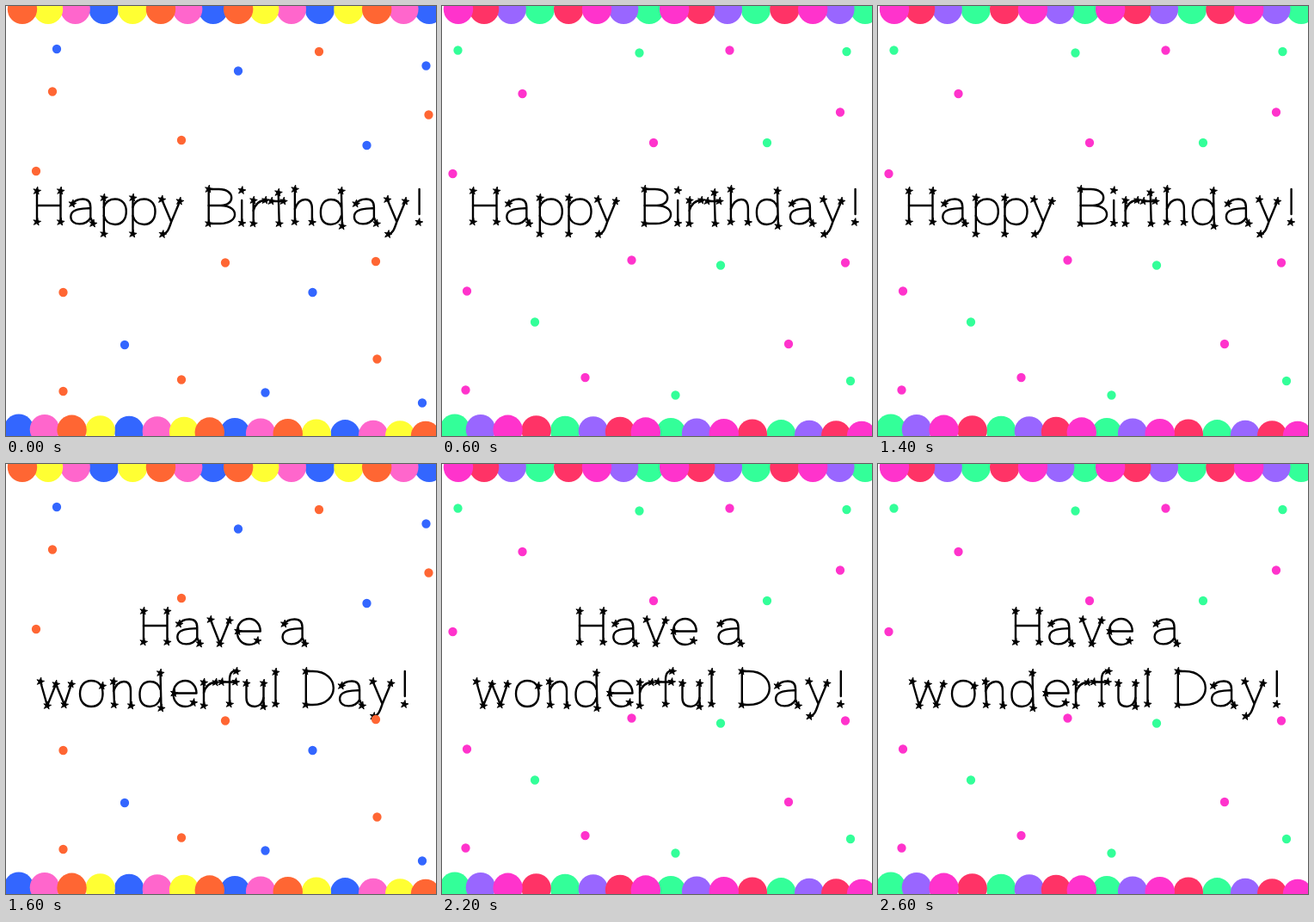
These frames come from a looping animation (500 px wide and 500 px high, 2.8 s). An HTML page:

```html
<!DOCTYPE html>
<html lang="en">
<head>
<meta charset="utf-8">
<title>Happy Birthday</title>
<style>
  html, body { margin: 0; width: 100%; height: 100%; overflow: hidden; background: #fff; }
  svg { display: block; width: 100vw; height: 100vh; }
  path { fill: none; stroke-linecap: round; stroke-linejoin: round; }
  .letter path { stroke: #000; stroke-width: 2.4; }
  .stars { marker: url(#star); }
  .label { fill: transparent; font: 300 50px Lato, sans-serif; }
  .dots path { stroke-width: 10.3; }
  .warm { --main: #f63; --alt: #ff3; --soft: #f6c; --deep: #36f; animation: early 400ms step-end infinite; }
  .cool { --main: #f3c; --alt: #f36; --soft: #96f; --deep: #3f9; animation: late 400ms step-end infinite; }
  .main { fill: var(--main); stroke: var(--main); }
  .alt { fill: var(--alt); }
  .soft { fill: var(--soft); }
  .deep { fill: var(--deep); stroke: var(--deep); }
  circle { stroke: none !important; }
  #greeting { animation: greeting 2800ms step-end infinite; }
  #wish { animation: wish 2800ms step-end infinite; }
  @keyframes early { 0% { visibility: visible; } 50%, 100% { visibility: hidden; } }
  @keyframes late { 0% { visibility: hidden; } 50%, 100% { visibility: visible; } }
  @keyframes greeting { 0% { visibility: visible; } 57.142857%, 100% { visibility: hidden; } }
  @keyframes wish { 0% { visibility: hidden; } 57.142857%, 100% { visibility: visible; } }
</style>
</head>
<body>
<svg viewBox="0 0 500 500">
  <marker id="star" markerUnits="userSpaceOnUse" overflow="visible" orient="10">
    <path d="M0-4.6L2.7 3.7L-4.4-1.4H4.4L-2.7 3.7Z" style="fill:#000;stroke:#000;stroke-width:.9"/>
  </marker>
  <g id="greeting"></g>
  <g id="wish"></g>
  <g class="warm dots">
    <path class="deep" d="M59 50h0M270 75.5h0M488.5 69.5h0M419.5 162h0M356.5 333h0M138 394h0M301.5 449.5h0M484 461.5h0"/>
    <path class="main" d="M54 99.5h0M364 53h0M491.5 126.5h0M204 156h0M35 192h0M255 298.5h0M430 297h0M66.5 333h0M431.5 410.5h0M204 434.5h0M66.5 448h0"/>
  </g>
  <g class="cool dots">
    <path class="deep" d="M18.5 51.5h0M229.5 54.5h0M470.5 53h0M378 159h0M324 301.5h0M108 367.5h0M271.5 452.5h0M475 436h0"/>
    <path class="main" d="M93.5 102h0M334.5 51.5h0M463 123.5h0M246 159h0M12.5 195h0M220.5 295.5h0M469 298.5h0M29 331.5h0M403 393h0M166.5 432h0M27.5 446.5h0"/>
  </g>
  <g class="warm scallops"></g>
  <g class="cool scallops"></g>
</svg>
<script>
const ARCH = 'M0-16C3-24 8-27 12-27C18-27 20-22 20-16V-1';

// Letter: advance, strokes with a star on every vertex, plain strokes.
const GLYPHS = {
  H: [39.3, 'M0-37V-1M27.5-37V-1', 'M0-20H27'],
  a: [38.5, 'M2-22M26 1', 'M2-22C5-26.5 10-27.5 14-27.5C20-27.5 23-24 23-18V-6L26 1M23-17C14-16 0-17 0-7C0 4 19 4 23-6'],
  p: [33.7, 'M0-29V13', 'M0-18C2-25 8-27.5 13-27.5C22-27.5 26-21 26-13C26-4 21 2 13 2C7 2 2-1 0-8'],
  y: [37.2, 'M0-27M21-25M1 13.5', 'M0-27L11-1M21-25L11-1C8 8 6 13 1 13'],
  B: [39, 'M0-39V1', 'M0-39H12C31-39 31-20 14-20H0M14-20C36-20 36 1 13 1H0'],
  i: [13, 'M-.5-37.5M-.5 .5', 'M-.5-26V0'],
  r: [21, 'M0-26V1M14-26', 'M0-14C2-21 6-26 14-26'],
  t: [27.2, 'M8-35L9 1M0-25H14', ''],
  h: [30, 'M0-39V-1M20-.5', ARCH],
  d: [39, 'M24-37L25 4', 'M24-18C22-25 17-27 12-27C4-27 0-21 0-12C0-3 4 2 12 2C18 2 22-1 24-8'],
  v: [31, 'M0-27L11 1L22-26', ''],
  e: [35.5, 'M1-13.5M23.5-2.5', 'M1-13.5H27C27-22 21-28 14-28C6-28 0-22 0-13C0-4 6 2 14 2C19 2 22 0 24-2'],
  w: [46, 'M0-27L8 1L18-24L28 0L36-24', ''],
  o: [39, 'M26-22', 'M0-13C0-22 5-28 13-28C22-28 26.5-22 26.5-13C26.5-4 22 2 13 2C5 2 0-4 0-13Z'],
  n: [30.5, 'M0-27L1 0M20.5 1', ARCH],
  f: [28.5, 'M17-39M9-1M0-26.5H16', 'M9-1V-29C9-37 12-40 17-39'],
  u: [34, 'M0-25M20-25V2', 'M0-25V-8C0-1 4 2 10 2C15 2 19-2 20-8'],
  l: [18, 'M0-38V-1', ''],
  D: [39.3, 'M0-39V0', 'M0-39H8C40-39 40 0 8 0H0'],
  '!': [12, 'M-.5-.5', 'M0-39V-10'],
  ' ': [17.3, '', '']
};

function write(id, text, left, base) {
  let x = left, letters = '';
  for (const ch of text) {
    const [advance, starred, plain] = GLYPHS[ch];
    letters += `<g class="letter" transform="translate(${x} ${base})">` +
      `<path class="stars" d="${starred}"/><path d="${plain}"/></g>`;
    x += advance;
  }
  document.getElementById(id).insertAdjacentHTML('beforeend',
    `<text class="label" x="${left}" y="${base}">${text}</text><g aria-hidden="true">${letters}</g>`);
}

const LAYERS = ['deep', 'soft', 'alt', 'main'];
const TOP = ['main', 'alt', 'soft', 'deep', 'alt', 'main', 'soft', 'deep'];
const BOTTOM = ['deep', 'soft', 'main', 'alt', 'deep', 'soft', 'alt', 'main'];

// Sixteen discs, slightly uneven in a cycle of eight.
function discs(layer, cycle, left, y, slope) {
  let html = '';
  for (let i = 0; i < 16; i++) {
    if (cycle[i % 8] !== layer) continue;
    const x = left + 31.4 * i - 2.8 * Math.sin(i * Math.PI / 4 + 0.5);
    html += `<circle class="${layer}" cx="${x}" cy="${y + slope * i}" r="17.2"/>`;
  }
  return html;
}

write('greeting', 'Happy Birthday!', 36, 252);
write('wish', 'Have a', 160, 208);
write('wish', 'wonderful Day!', 40, 280);

const edging = LAYERS.map(layer =>
  discs(layer, TOP, 20.3, 3.8, 0) + discs(layer, BOTTOM, 16.2, 491.7, 0.55)).join('');
for (const row of document.querySelectorAll('.scallops')) row.innerHTML = edging;
</script>
</body>
</html>
```
